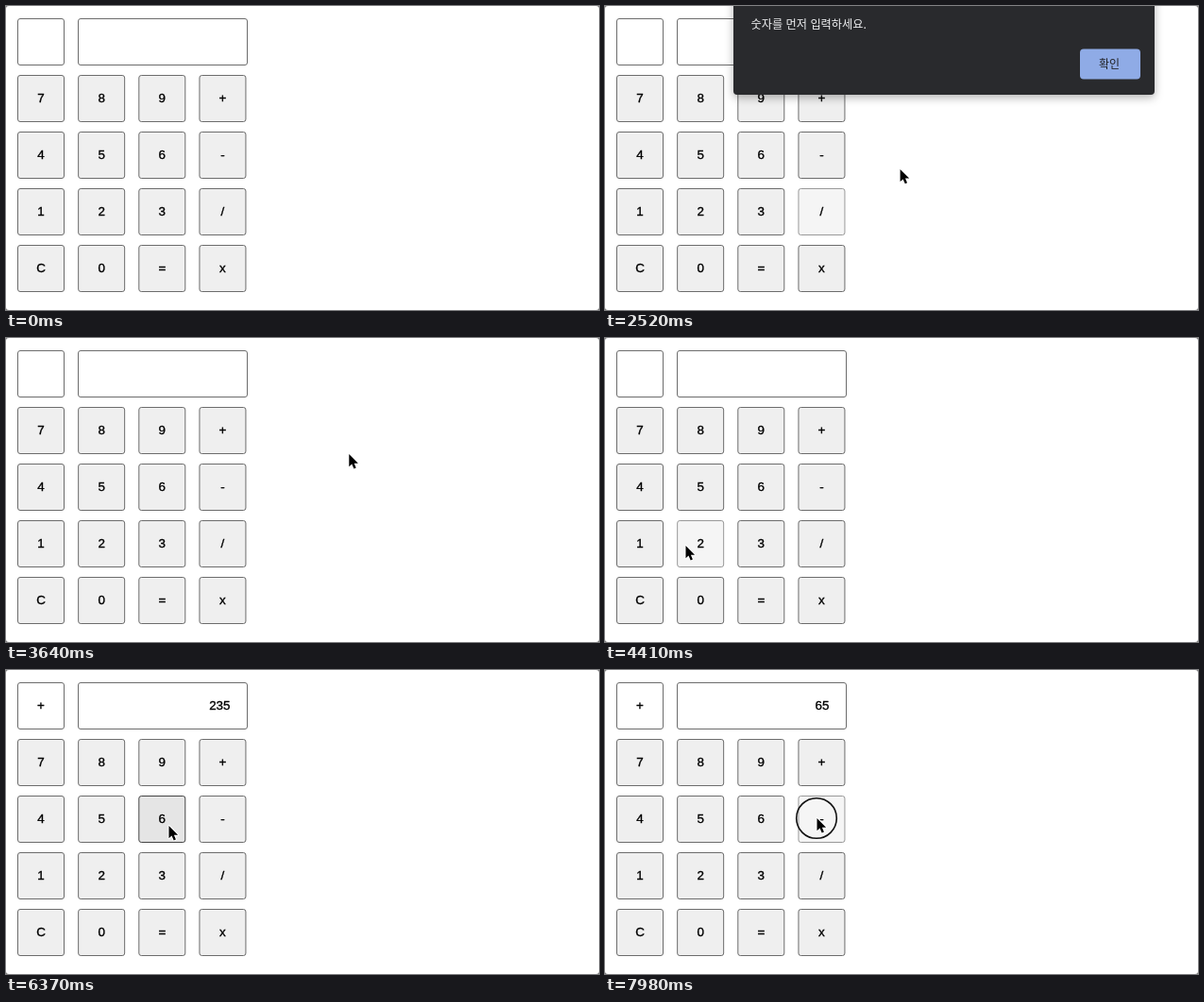
Recreate the animation shown at these times as an HTML page. Size 628 by 322 pixels, loop 8000 ms.

```html
<!DOCTYPE html>
<html lang="ko">
<head>
<meta charset="utf-8">
<title>Calculator</title>
<style>
  html, body { margin: 0; width: 100%; height: 100%; overflow: hidden; background: #777; }
  svg { display: block; width: 628px; height: 322px; }
  #calc { font: 13.4px "Liberation Sans", Arial, sans-serif; text-anchor: middle; }
  #calc text { stroke: #000; stroke-width: .35; }
  #calc rect { fill: #fff; stroke: #6c6c6c; }
  #calc .key rect { fill: #efefef; }
  #calc .hover rect { fill: #e5e5e5; stroke: #444; }
  #calc .active rect { fill: #f5f5f5; stroke: #999; }
  #alert { font: 500 12.2px "Noto Sans CJK KR", "Noto Sans CJK", sans-serif; }
  #panel { fill: #292a2d; filter: drop-shadow(0 3px 5px rgba(0, 0, 0, .3)); }
</style>
</head>
<body>
<svg viewBox="0 0 628 322">
  <rect width="628" height="322" rx="3" fill="#fff"/>
  <g id="calc">
    <rect x="12.5" y="13.5" width="49" height="49" rx="2.5"/>
    <rect x="76.5" y="13.5" width="179" height="49" rx="2.5"/>
    <text id="op" x="37" y="42.3"></text>
    <text id="value" x="237.5" y="42.3" style="text-anchor: end"></text>
  </g>
  <g id="alert">
    <path id="panel"/>
    <g id="content">
      <text x="154.5" y="23.8" fill="#f0f1f3">숫자를 먼저 입력하세요.</text>
      <rect x="503" y="45.5" width="64" height="32" rx="4" fill="#8fabe6"/>
      <text x="534" y="65.5" font-size="12" text-anchor="middle" fill="#202124">확인</text>
    </g>
  </g>
  <circle id="ring" r="21.3" fill="none" stroke="#111" stroke-width="1.6"/>
  <path id="cursor" d="M0 0V13.2L3 10.5L5.2 15.4L7.4 14.4L5.4 9.7H9.6Z" stroke="#fff" stroke-width="2" paint-order="stroke" stroke-linejoin="round"/>
</svg>
<script>
const LOOP = 8000, STEP = 70, SIZE = 49;
const $ = id => document.getElementById(id);

function add(parent, tag, attrs, text = "") {
  const el = document.createElementNS("http://www.w3.org/2000/svg", tag);
  for (const name in attrs) el.setAttribute(name, attrs[name]);
  el.textContent = text;
  return parent.appendChild(el);
}

const keys = [..."789+456-123/C0=x"].map((label, i) => {
  const x = 12.5 + 64.15 * (i % 4), y = 73.5 + 60 * Math.floor(i / 4);
  const el = add($("calc"), "g", { class: "key" });
  add(el, "rect", { x, y, width: SIZE, height: SIZE, rx: 2.5 });
  add(el, "text", { x: x + SIZE / 2, y: y + 28.8 }, label);
  return { label, x, y, el };
});

const click = (label, x, y, down, hold = 140) => ({ label, x, y, down, up: down + hold });
const focus = click("", 235, 212, 1120);
const divide = click("/", 235, 212, 1750, STEP);
const confirm = click("OK", 515, 70, 3220);
const clicks = [
  focus, divide, confirm,
  click("2", 85, 220, 4270), click("3", 157, 218, 4760), click("5", 112.5, 166, 5320),
  click("+", 235, 103, 5880), click("6", 172, 165, 6720), click("5", 113, 161, 7350, STEP),
  click("-", 224, 157, 7980)
];
const alertOpen = divide.up + 2 * STEP, alertEnd = confirm.up + 3 * STEP;

const mix = (a, b, p) => a + (b - a) * p;
const clamp = p => Math.min(1, Math.max(0, p));
// Ease in and out with a small overshoot
const reach = p => p * p * (3 - 2 * p) + .4 * p * p * Math.sin(Math.PI * p);

function pointer(t) {
  if (t < focus.up) {
    const p = clamp((t - STEP) / 910);
    return [mix(18, focus.x, p), mix(297, focus.y, p) - 150 * Math.sin(Math.PI * p) ** 2];
  }
  const i = clicks.findIndex(c => c.up + STEP > t);
  const to = clicks[i < 0 ? clicks.length - 1 : i];
  const from = clicks[clicks.indexOf(to) - 1] || focus;
  const leave = Math.max(from.up + STEP, to.down - 12 * STEP);
  const travel = 140 + .95 * Math.hypot(to.x - from.x, to.y - from.y);
  const arrive = Math.min(leave + travel, to.down - STEP);
  const p = reach(clamp((t - leave) / (arrive - leave)));
  return [mix(from.x, to.x, p), mix(from.y, to.y, p)];
}

// Keys react one step late, and stay frozen behind the alert
function hovered(t) {
  if (t < divide.down - 2 * STEP) return "";
  if (t < alertEnd) return "/";
  const [px, py] = pointer(t - STEP);
  const inside = d => d >= 0 && d <= SIZE;
  return keys.find(k => inside(px - k.x) && inside(py - k.y))?.label;
}

function pressed(t) {
  if (t >= divide.down && t <= confirm.up) return "/";
  return clicks.find(c => t >= c.down && t < c.up + STEP)?.label;
}

function compute(t) {
  let op = "", value = "", fresh = true;
  for (const { label, up } of clicks) {
    if (t < up + STEP) break;
    if (/\d/.test(label)) {
      value = fresh ? label : value + label;
      fresh = false;
    } else if (value) {
      op = label;
      fresh = true;
    }
  }
  return { op, value };
}

function drawAlert(t) {
  const away = Math.max(1 - (t - alertOpen + STEP) / (2 * STEP), (t - confirm.up) / (3 * STEP), 0);
  const left = 136 - 3 * away, right = 582 + 3 * away, bottom = 94 - 20 * away;
  $("alert").style.display = t >= alertOpen && t < alertEnd ? "" : "none";
  $("alert").setAttribute("opacity", clamp(1 - 1.08 * away));
  $("panel").setAttribute("d",
    `M${136 + 10 * away} -12L${left} ${bottom - 4}q0 4 4 4` +
    `H${right - 4}q4 0 4 -4L${582 - 7 * away} -12Z`);
  $("content").setAttribute("transform", `translate(${-3 * away} ${-21 * away})`);
}

function draw(t) {
  const hover = hovered(t), press = pressed(t);
  for (const { label, el } of keys) {
    const state = label === press ? " active" : label === hover ? " hover" : "";
    el.setAttribute("class", "key" + state);
  }
  const { op, value } = compute(t);
  $("op").textContent = op;
  $("value").textContent = value;
  drawAlert(t);

  const [x, y] = pointer(t);
  $("cursor").style.display = t < STEP ? "none" : "";
  $("cursor").setAttribute("transform", `translate(${x + .5} ${y})`);
  $("ring").style.display = clicks.some(c => t >= c.down && t < c.up) ? "" : "none";
  $("ring").setAttribute("cx", x);
  $("ring").setAttribute("cy", y);
}

const start = performance.now();
function tick() {
  const t = (performance.now() - start) % LOOP;
  draw(Math.floor(t / STEP) * STEP);
  requestAnimationFrame(tick);
}
tick();
</script>
</body>
</html>
```
